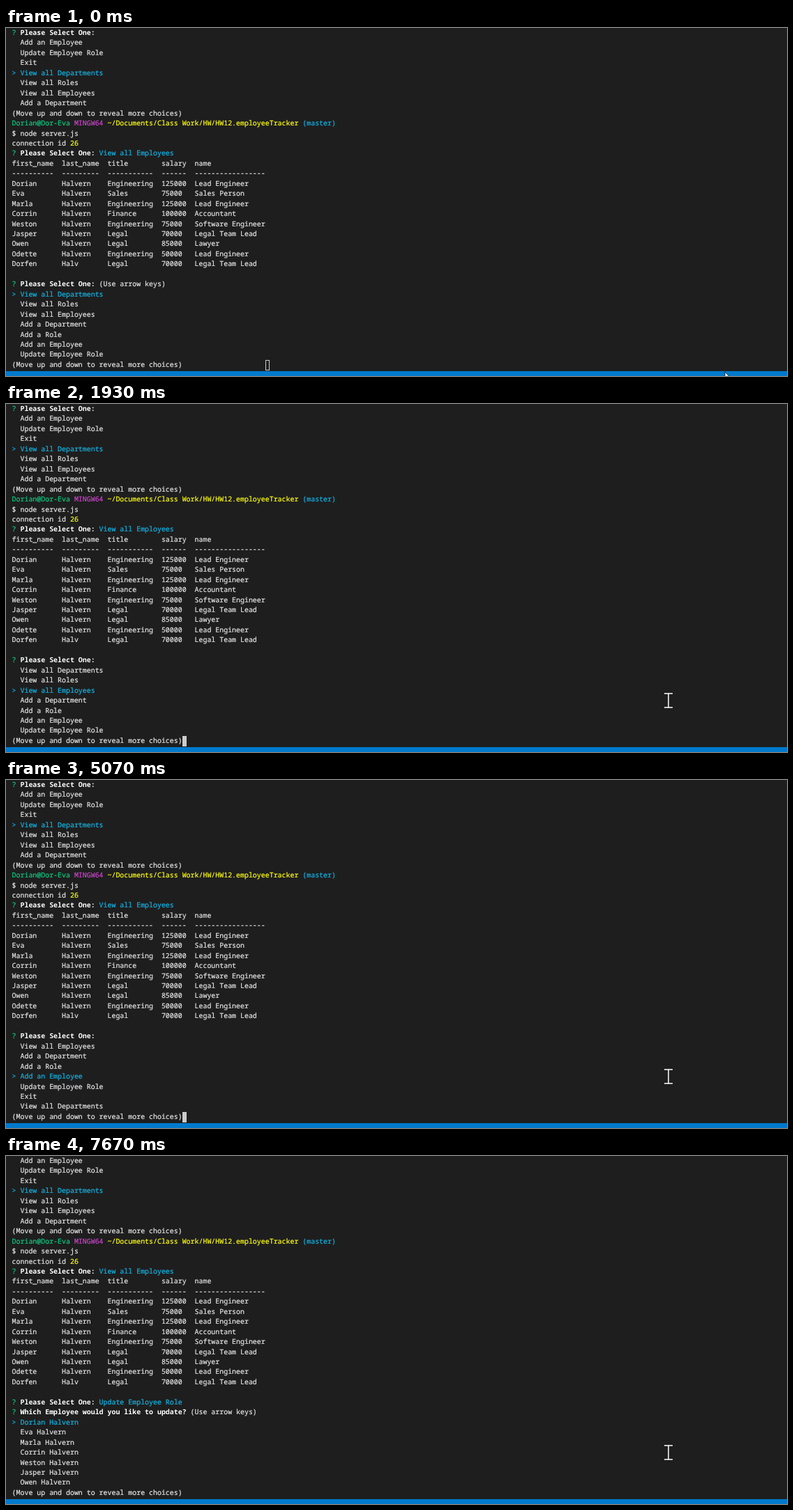
Write an HTML page that moves like this. It is 1120x500 px and loops after 8 s.

```html
<!DOCTYPE html>
<html lang="en">
<head>
<meta charset="utf-8">
<title>Terminal menu</title>
<style>
  html, body { margin: 0; width: 100%; height: 100%; overflow: hidden; background: #1e1e1e; }
  svg { display: block; width: 1120px; height: 500px; }
  text, tspan { fill: currentColor; stroke: currentColor; stroke-width: .22px; }
  text { font: 9.94px "Noto Sans Mono", "DejaVu Sans Mono", monospace; white-space: pre; color: #e4e4e4; text-rendering: geometricPrecision; }
  .green { color: #10c880; }
  .cyan { color: #14b2e2; }
  .yellow { color: #ffff10; }
  .purple { color: #c844c8; }
  .bold { color: #fff; font-weight: 700; stroke: none; }
</style>
</head>
<body>
<svg viewBox="0 0 1120 500">
  <rect width="1120" height="500" fill="#1e1e1e"/>
  <g id="screen"></g>
  <rect id="block"/>
  <rect y="493" width="1120" height="7" fill="#007acc"/>
  <path id="arrow" d="M0 0V15L3.5 11.7L6 17L8 16L5.7 11H10Z" fill="#fff" stroke="#000" stroke-width=".8"/>
  <path id="beam" d="M-6 -10H6M0 -10V10M-6 10H6" fill="none" stroke="#fff" stroke-width="1.5"/>
</svg>
<script>
const LOOP = 8000, LEFT = 8.6, ROW = 14.45, BASE = 10, CHAR = 5.964;
const $ = id => document.getElementById(id);
const span = (cls, s) => `<tspan class="${cls}">${s}</tspan>`;

const options = ["View all Departments", "View all Roles", "View all Employees", "Add a Department",
  "Add a Role", "Add an Employee", "Update Employee Role", "Exit"];
const people = [
  ["Dorian", "Halvern", "Engineering", "125000", "Lead Engineer"],
  ["Eva", "Halvern", "Sales", "75000", "Sales Person"],
  ["Marla", "Halvern", "Engineering", "125000", "Lead Engineer"],
  ["Corrin", "Halvern", "Finance", "100000", "Accountant"],
  ["Weston", "Halvern", "Engineering", "75000", "Software Engineer"],
  ["Jasper", "Halvern", "Legal", "70000", "Legal Team Lead"],
  ["Owen", "Halvern", "Legal", "85000", "Lawyer"],
  ["Odette", "Halvern", "Engineering", "50000", "Lead Engineer"],
  ["Dorfen", "Halv", "Legal", "70000", "Legal Team Lead"]
];
const widths = [10, 9, 11, 6, 17];
const tableRow = cells => cells.map((c, i) => c.padEnd(widths[i])).join("  ");

const ask = (question, rest = "") => span("green", "?") + span("bold", ` ${question} `) + rest;
const select = rest => ask("Please Select One:", rest);
const list = (items, picked) => [
  ...items.map((s, i) => i === picked ? span("cyan", "&gt; " + s) : "  " + s),
  "(Move up and down to reveal more choices)"
];
const menu = (start, picked) =>
  list(Array.from({ length: 7 }, (_, i) => options[(start + i) % options.length]), picked);

const history = [
  select(),
  ...menu(5, 3),
  span("green", "Dorian@Dor-Eva ") + span("purple", "MINGW64 ") +
    span("yellow", "~/Documents/Class Work/HW/HW12.employeeTracker ") + span("cyan", "(master)"),
  "$ node server.js",
  "connection id " + span("yellow", "26"),
  select(span("cyan", "View all Employees")),
  tableRow(["first_name", "last_name", "title", "salary", "name"]),
  tableRow(widths.map(n => "-".repeat(n))),
  ...people.map(tableRow),
  ""
];

const answered = [...history, select(span("cyan", options[6]))];
const choose = (start, picked, hint) => [...history, select(hint), ...menu(start, picked)];
const names = people.slice(0, 7).map(p => p[0] + " " + p[1]);

// start time, lines, column of the cursor block
const steps = [
  [0, choose(0, 0, "(Use arrow keys)"), 61],
  [1520, history],
  [1580, choose(0, 1), 41],
  [1850, history],
  [1930, choose(0, 2), 41],
  [2830, history],
  [2890, choose(0, 3), 41],
  [3810, history],
  [3870, choose(1, 3), 41],
  [5070, choose(2, 3), 41],
  [6920, choose(3, 3), 41],
  [7430, answered],
  [7670, [...answered.slice(1), ask("Which Employee would you like to update?", "(Use arrow keys)"), ...list(names, 0)]]
];

let shown;
function drawScreen(step) {
  if (step === shown) return;
  shown = step;
  $("screen").innerHTML = step[1].map((line, i) =>
    `<text x="${LEFT}" y="${(BASE + i * ROW).toFixed(2)}">${line}</text>`).join("");
}

function drawBlock(column, focused) {
  const block = $("block");
  block.style.display = column ? "" : "none";
  if (!column) return;
  const inset = focused ? 0 : 0.5;
  block.setAttribute("x", Math.round(LEFT + column * CHAR) + inset);
  block.setAttribute("y", 477 + inset);
  block.setAttribute("width", 6 - 2 * inset);
  block.setAttribute("height", 15 - 2 * inset);
  block.setAttribute("fill", focused ? "#ccc" : "none");
  block.setAttribute("stroke", focused ? "none" : "#ccc");
}

function drawMouse(t) {
  // the pointer is sampled every 45 ms and rests before the click
  const p = t < 30 ? 0 : Math.min(1, (Math.floor((t - 30) / 45) + 1) / 8);
  const e = 1 - (1 - p) ** 2;
  const x = 1031 - 81 * e, y = 494 - 68 * e;
  const over = y < 493;
  $("arrow").style.display = over ? "none" : "";
  $("beam").style.display = over ? "" : "none";
  $(over ? "beam" : "arrow").setAttribute("transform", `translate(${x.toFixed(1)} ${y.toFixed(1)})`);
}

function draw(t) {
  const step = steps.filter(s => s[0] <= t).pop();
  drawScreen(step);
  drawBlock(step[2], t >= 390);
  drawMouse(t);
}

const begin = performance.now();
function tick() {
  draw((performance.now() - begin) % LOOP);
  requestAnimationFrame(tick);
}
tick();
</script>
</body>
</html>
```
